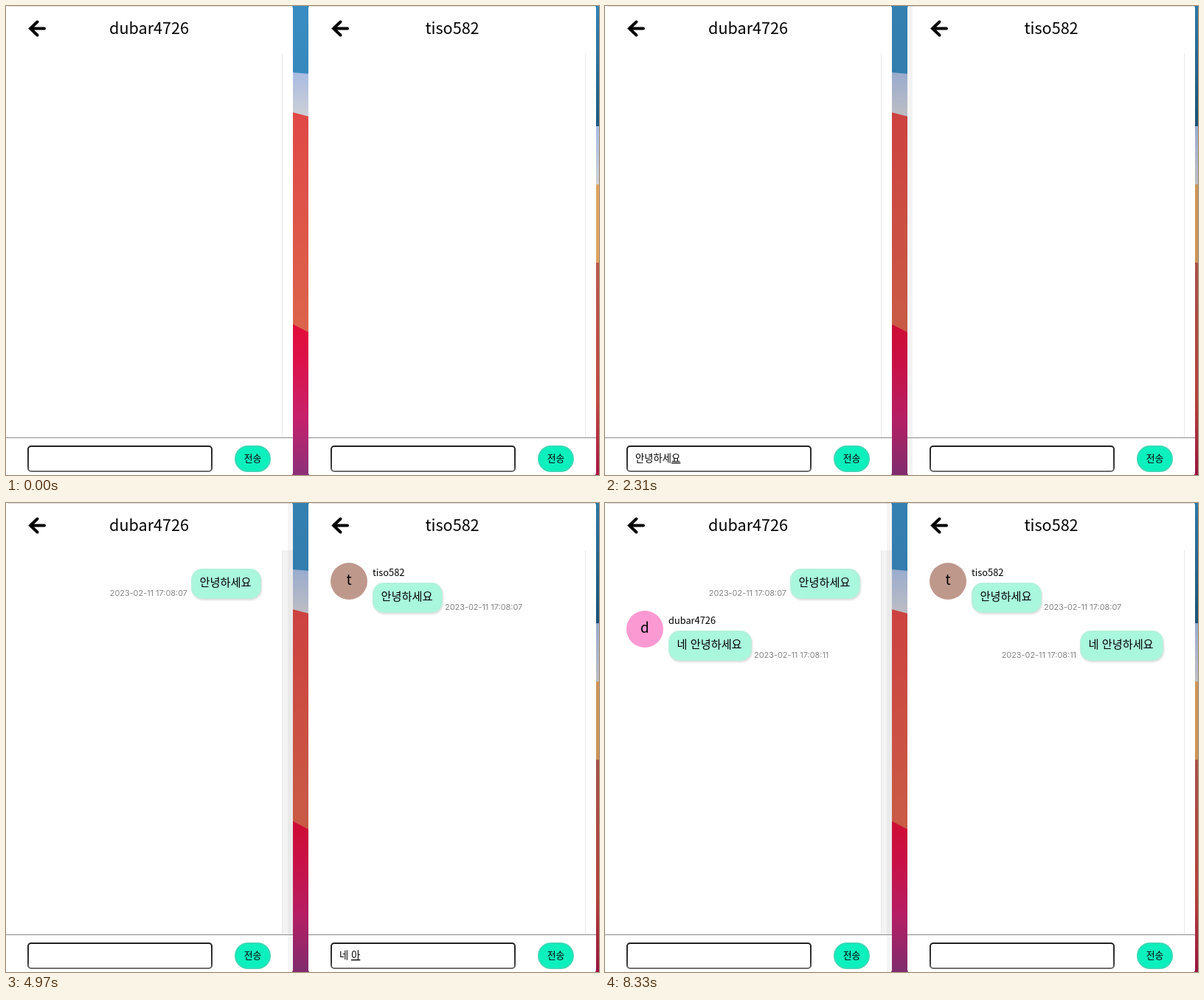
Recreate the animation shown at these times as an HTML page. Size 804 px wide and 636 px high, loop 8.68 s.

```html
<!DOCTYPE html>
<html lang="ko">
<head>
<meta charset="utf-8">
<style>
  html, body { margin: 0; width: 100%; height: 100%; overflow: hidden; background: #fff; }
  svg { display: block; width: 804px; height: 636px; }
  text { font-family: "Noto Sans CJK KR", "Noto Sans CJK", "Noto Sans KR", sans-serif; white-space: pre; }
  .title { font-size: 21.6px; text-anchor: middle; }
  .name { font-size: 12.8px; }
  .letter { font-size: 19px; text-anchor: middle; }
  .msg { font-size: 15.2px; font-weight: 500; }
  .time { font: 10.9px Inter, sans-serif; fill: #858585; }
  .send { font-size: 12.8px; font-weight: 500; text-anchor: middle; }
  .typed { font-size: 13.33px; }
  .compose { text-decoration: underline; }
  .bubble { fill: #a9f7dd; stroke: #b3f1de; stroke-width: 2; filter: drop-shadow(1px 2px 1px #0002); }
</style>
</head>
<body>
<svg id="stage" viewBox="0 0 804 636">
  <defs>
    <linearGradient id="sky" x2="0" y2="1"><stop stop-color="#398cc1"/><stop offset="1" stop-color="#3789bd"/></linearGradient>
    <linearGradient id="mist" x2="0" y2="1"><stop stop-color="#a8bbe1"/><stop offset="1" stop-color="#cfd0d6"/></linearGradient>
    <linearGradient id="coral" x2="0" y2="1"><stop stop-color="#e04846"/><stop offset="1" stop-color="#dc644b"/></linearGradient>
    <linearGradient id="berry" x2="0" y2="1"><stop stop-color="#e10d38"/><stop offset=".25" stop-color="#dc124b"/><stop offset=".62" stop-color="#c6216c"/><stop offset="1" stop-color="#8b3078"/></linearGradient>
    <linearGradient id="deep" x2="0" y2="1"><stop stop-color="#2f83b8"/><stop offset="1" stop-color="#1c5a80"/></linearGradient>
    <linearGradient id="rust" x2="0" y2="1"><stop stop-color="#b9584e"/><stop offset=".65" stop-color="#c4463f"/><stop offset="1" stop-color="#a81545"/></linearGradient>
    <linearGradient id="frame" x2="0" y2="1"><stop stop-color="#222"/><stop offset=".8" stop-color="#3a3a3a"/><stop offset="1" stop-color="#707070"/></linearGradient>
  </defs>
  <path fill="url(#sky)" d="M388 0h23v93l-23-2z"/>
  <path fill="url(#mist)" d="M388 90l23 2v59h-23z"/>
  <path fill="url(#coral)" d="M388 144l23 6v293h-23z"/>
  <path fill="url(#berry)" d="M388 431l23 12v193h-23z"/>
  <path fill="url(#deep)" d="M799 0h5v163h-5z"/>
  <path fill="url(#mist)" d="M799 163h5v79h-5z"/>
  <path fill="#dfa460" d="M799 242h5v106h-5z"/>
  <path fill="url(#rust)" d="M799 348h5v288h-5z"/>
  <path id="dim" d="M388 0h23v636h-23zM799 0h5v636h-5z" opacity="0"/>
  <g id="windows"></g>
</svg>
<script>
const LOOP = 8680;
const HELLO = '안녕하세요', REPLY = '네 안녕하세요';
const LEFT = 'dubar4726', RIGHT = 'tiso582';
const T1 = '2023-02-11 17:08:07', T2 = '2023-02-11 17:08:11';
const $ = id => document.getElementById(id);

const bubble = (x, y, w, text) =>
  `<rect class="bubble" x="${x + 1}" y="${y + 1}" width="${w - 2}" height="39" rx="14"/>
   <text class="msg" x="${x + 11.5}" y="${y + 24}">${text}</text>`;

const sent = (id, x, y, w, text, time) =>
  `<g id="${id}">${bubble(x, y, w, text)}
   <text class="time" x="${x - 5}" y="${y + 37}" text-anchor="end">${time}</text></g>`;

const received = (id, x, y, w, text, time, name, color) =>
  `<g id="${id}"><circle cx="${x + 25}" cy="${y + 25}" r="25" fill="${color}"/>
   <text class="letter" x="${x + 25}" y="${y + 30}">${name[0]}</text>
   <text class="name" x="${x + 57}" y="${y + 18}">${name}</text>
   ${bubble(x + 57, y + 27, w, text)}
   <text class="time" x="${x + 60 + w}" y="${y + 64}">${time}</text></g>`;

const chat = (id, x, w, title, shade, messages) => `
  <rect x="${x}" width="${w}" height="636" rx="3" fill="#fff"/>
  <path d="M${x + 3} .5h${w - 6}" stroke="#ddd"/>
  <g id="${id}Shade" opacity="0">${shade}</g>
  <g transform="translate(${x ? 411 : 0})">
    <path d="M52 30.5H33M42.5 21.5L33 30.5L42.5 39.5" fill="none" stroke="#000" stroke-width="4" stroke-linecap="round"/>
    <text class="title" x="194" y="38">${title}</text>
    <path d="M374.5 64V585" stroke="#e9e9e9"/>
    <path d="M${x ? -1 : 0} 585.5H389" stroke="#8c8c8c"/>
    <rect x="30" y="597" width="249" height="34" rx="4" fill="#fff" stroke="url(#frame)" stroke-width="2"/>
    <text class="typed" x="41" y="618" id="${id}Text"></text>
    <path id="${id}Caret" d="M41.5 606V621" stroke="#000"/>
    <rect x="311" y="597" width="47" height="34" rx="17" fill="#0bf0bd" stroke="#3ad9b6" stroke-width="2"/>
    <text class="send" x="334.5" y="618">전송</text>
  </g>${messages}`;

$('windows').innerHTML =
  chat('a', 0, 389, LEFT,
    '<path fill="#f3f3f3" d="M375 64h14v521h-14z"/><path fill="#0000000a" d="M382 0h7v636h-7z"/>',
    sent('aSent', 251, 89, 95, HELLO, T1) +
    received('aGot', 29, 146, 113, REPLY, T2, LEFT, '#fb99d3')) +
  chat('b', 410, 390, RIGHT,
    '<path fill="#0000000c" d="M410 0h7v636h-7z"/>',
    received('bGot', 440, 81, 95, HELLO, T1, RIGHT, '#bf988c') +
    sent('bSent', 644, 173, 113, REPLY, T2));

// Keystrokes: [time, text]; the last syllable is being composed.
const typing = {
  a: [[1400, '아'], [1540, '안'], [1610, '안녀'], [1750, '안녕'], [1890, '안녕하'],
      [2030, '안녕하세'], [2170, '안녕하셍'], [2310, HELLO], [2730, '']],
  b: [[4830, '네'], [4900, '네 '], [4970, '네 아'], [5110, '네 안'], [5180, '네 안녀'], [5250, '네 안녕'],
      [5390, '네 안녕하'], [5530, '네 안녕하세'], [5600, '네 안녕하셍'], [5740, REPLY], [6720, '']]
};
const commit = { a: 2450, b: 5880 };
const carets = {
  a: [[280, 840], [1330, 1400], [2730, 3290]],
  b: [[3920, 4270], [4760, 4830], [6720, 7280], [7840, 8330]]
};
const arrivals = { aSent: 2730, bGot: 3010, bSent: 6720, aGot: 7140 };

const show = (id, on) => $(id).setAttribute('visibility', on ? 'visible' : 'hidden');
const fade = (id, v) => $(id).setAttribute('opacity', v);
const ramp = (t, from, length) => Math.min(1, Math.max(0, (t - from) / length));

function drawInput(id, t) {
  let text = '';
  for (const [at, value] of typing[id]) if (t >= at) text = value;
  const open = t < commit[id] && text && !text.endsWith(' ');
  $(id + 'Text').innerHTML = open
    ? `${text.slice(0, -1)}<tspan class="compose">${text.slice(-1)}</tspan>` : text;
  show(id + 'Caret', carets[id].some(([on, off]) => t >= on && t < off));
}

function draw(now) {
  const t = now % LOOP;
  const leftFocus = t < 3850 ? ramp(t, 70, 210) : 0;
  const rightFocus = t >= 3920 ? 1 : 0;
  fade('dim', 0.085 * Math.max(leftFocus, rightFocus));
  fade('bShade', leftFocus);
  fade('aShade', rightFocus);
  for (const id in arrivals) show(id, t >= arrivals[id]);
  drawInput('a', t);
  drawInput('b', t);
}

let start;
function tick(now) {
  start ??= now;
  draw(now - start);
  requestAnimationFrame(tick);
}
draw(0);
requestAnimationFrame(tick);
</script>
</body>
</html>
```
